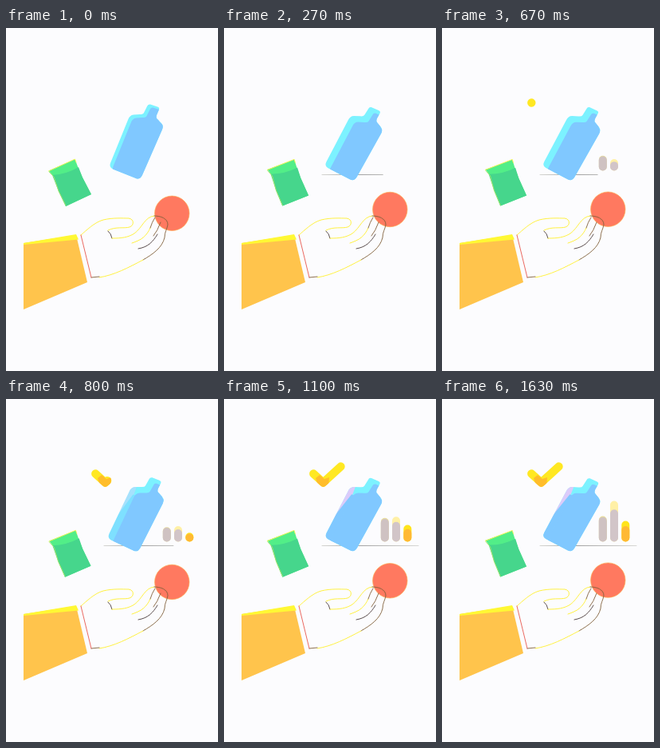
An HTML page that plays this animation: 266x429 px, repeating every 1660 ms.

```html
<!DOCTYPE html>
<html lang="en">
<head>
<meta charset="utf-8">
<title>Hand and products</title>
<style>
html, body { margin: 0; width: 100%; height: 100%; overflow: hidden; background: #fcfcfe; }
svg { display: block; width: 100%; height: 100%; }
.line { fill: none; stroke-width: .9; stroke-linecap: round; stroke-linejoin: round; }
.yellow { stroke: #fff02e; }
.dark { stroke: #4a3c3c; }
.brown { stroke: #80603c; }
</style>
</head>
<body>
<svg viewBox="0 0 266 429">
  <defs>
    <linearGradient id="ground" gradientUnits="userSpaceOnUse" x1="123" y1="0" x2="245" y2="0">
      <stop offset="0" stop-color="#d0d0cc"/>
      <stop offset=".4" stop-color="#999"/>
      <stop offset="1" stop-color="#d4d4d0"/>
    </linearGradient>
    <path id="shape" d="M177 98Q178 95 181 95.5L190 98.5Q193 99.5 192 102L189 109Q188 113 190 114L195 119Q198 122 196 127
      L171 184Q168 190 163 188L134 176.5Q129 174 131 169L153 115Q155 109 160 108.5L168 108Q172 108 173 106Z"/>
    <clipPath id="inBottle"><use href="#shape"/></clipPath>
    <clipPath id="tick"><path d="M115 99L120 95L126 100L132 98L131 112H119Z"/></clipPath>
  </defs>

  <path id="floor" class="line" stroke="url(#ground)"/>

  <g id="bars"></g>

  <g id="check" fill="none" stroke-width="10.4" stroke-linecap="round" stroke-linejoin="round">
    <path stroke="#ffe822" pathLength="1" d="M112.3 93.5L124.5 104.5L146.5 84.5"/>
    <path stroke="#ffbd2b" pathLength="1" clip-path="url(#tick)" d="M112.3 93.5L124.5 104.5L146.5 84.5"/>
  </g>

  <g id="bottle">
    <use href="#shape" fill="#7cf2ff"/>
    <g clip-path="url(#inBottle)">
      <g id="fill">
        <path fill="#dccbfa" d="M150 108H162L157 126L147 150H130Z"/>
        <path fill="#80c8ff" d="M158 118L139 147L124 180H150L165 120Z"/>
      </g>
      <use id="front" href="#shape" fill="#80c8ff"/>
    </g>
  </g>

  <g id="card">
    <path fill="#52ee88" d="M53.5 178.5L86.5 164L91 176L96 187L107 208L75 223L66 204L60 186Z"/>
    <path fill="#46d68c" d="M58 184Q76 183 91 174L96 187L107 208L75 223L66 204Z"/>
    <path class="line" stroke="#fbf650" stroke-width="1.6" d="M53.5 179L86.5 164L88 168"/>
    <path class="line" stroke="#a7e66a" d="M54 180L60 186L66 204L75 222"/>
  </g>

  <path fill="#ffc44c" d="M22 269L88 259L102 318L22 352Z"/>
  <path fill="#fff834" d="M22 269L88 258L91 264.5L22 271Z"/>

  <circle id="ball" cx="208.3" r="21.7" fill="#ff7960" stroke="#ffa850" stroke-width=".7"/>

  <g class="line">
    <path class="yellow" d="M94 259C101 253 111 243 122 240C134 237 147 238 154 238C161 239 161 247 155 249C148 251 138 248 128 253"/>
    <path class="dark" d="M128 254Q132 257 133 263"/>
    <path class="yellow" d="M133 263C145 263 153 262 161 257C171 250 174 236 186 235"/>
    <path class="brown" d="M186 235C194 235 203 238 203 246C202 252 199 255 199 262C196 275 184 283 172 290"/>
    <path class="yellow" d="M172 290C153 300 136 309 117 312"/>
    <path class="brown" d="M117 311L107 312"/>
    <path stroke="#e8594e" d="M94 259L107 312"/>
    <path class="yellow" d="M181 250C176 261 170 265 158 269"/>
    <path class="brown" d="M187 237Q183 243 181 250M194 243Q190 254 185 260"/>
    <path class="dark" d="M190 258C184 268 178 274 166 276"/>
  </g>
</svg>
<script>
const LOOP = 1660, SWAY = 462;
const $ = id => document.getElementById(id);
const set = (el, attrs) => { for (const k in attrs) el.setAttribute(k, attrs[k]); };
const ramp = (t, from, to) => Math.min(1, Math.max(0, (t - from) / (to - from)));
const mix = (a, b, u) => a + (b - a) * u;
const seen = on => on ? "visible" : "hidden";

// Each bar pops in as a dot, then grows by a steady part and a swaying part
const bars = [
  { x: 201.8, start: 390, end: 1090, grow: 4, swing: 18, cap: .04, color: "#cfc2c2", tip: "#e8dc9c" },
  { x: 216, start: 560, end: 1600, grow: 41, swing: 0, cap: .21, color: "#d2c5c8", tip: "#fff0a6" },
  { x: 230.3, start: 760, end: 1260, grow: 16, swing: 0, cap: .25, color: "#ffb934", tip: "#ffe41c" }
];

function addRect(x, fill) {
  const rect = document.createElementNS("http://www.w3.org/2000/svg", "rect");
  set(rect, { x: x - 5, width: 10, rx: 5, fill });
  return $("bars").appendChild(rect);
}

for (const bar of bars) {
  bar.tipEl = addRect(bar.x, bar.tip);
  bar.bodyEl = addRect(bar.x, bar.color);
}

function drawBar(bar, t, sway) {
  const height = 10 + ramp(t, bar.start, bar.end) * (bar.grow + bar.swing * sway);
  const place = (el, h) => set(el, { y: 178.5 - h, height: h, visibility: seen(t >= bar.start) });
  place(bar.tipEl, height);
  place(bar.bodyEl, Math.max(10, height * (1 - bar.cap)));
}

function drawBottle(t, sway) {
  const shift = ramp(t, 0, 220);
  set($("bottle"), { transform: `rotate(${6 * sway} 164 142) translate(0 ${1.8 * shift})` });
  set($("front"), { transform: `translate(${mix(3.5, 6, shift)} ${mix(4, 7, shift)})` });
  set($("fill"), { opacity: ramp(t, 740, 880) });
}

function floorLength(t) {
  if (t < 430) return 121 * t / 430;
  return t < 670 ? mix(121, 72, ramp(t, 430, 670)) : mix(72, 121, ramp(t, 670, 1100));
}

function draw(t) {
  const sway = t > 3.5 * SWAY ? 1 : (1 - Math.cos(2 * Math.PI * t / SWAY)) / 2;
  drawBottle(t, sway);
  set($("card"), { transform: `rotate(${3.5 * sway} 81 193)` });
  set($("ball"), { cy: 231.8 - 5.2 * sway });
  set($("floor"), { d: `M123 183.5h${floorLength(t)}`, visibility: seen(t >= 30) });
  set($("check"), { visibility: seen(t >= 510), "stroke-dasharray": `${mix(.001, 1, ramp(t, 680, 960))} 2` });
  bars.forEach(bar => drawBar(bar, t, sway));
}

const begin = performance.now();
function tick(now) {
  draw(Math.max(0, now - begin) % LOOP);
  requestAnimationFrame(tick);
}
draw(0);
requestAnimationFrame(tick);
</script>
</body>
</html>
```
